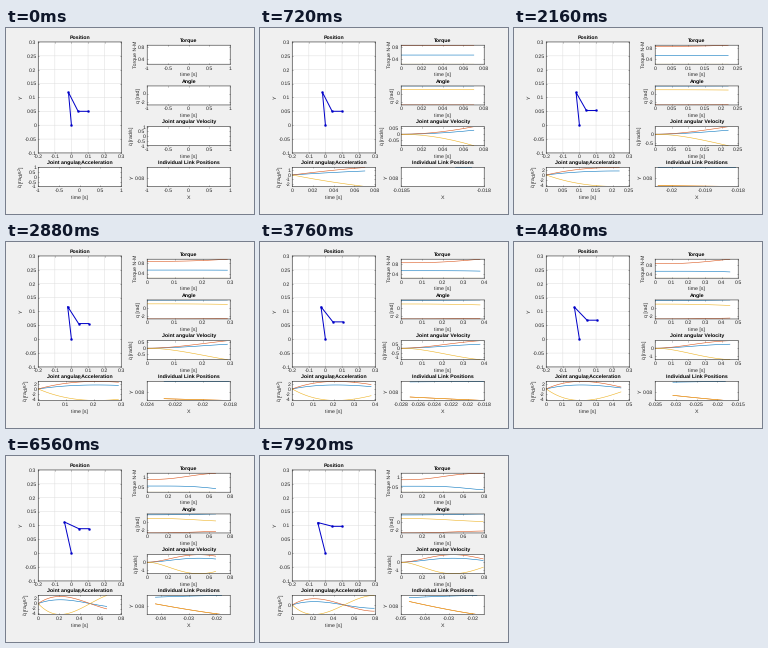
These frames come from a looping animation (248x186 px, 8 s). A matplotlib script:

```python
import math

import matplotlib.pyplot as plt
import numpy as np
from matplotlib.animation import FuncAnimation

W, H, PT = 248, 186, 0.72
BLUE, ORANGE, YELLOW = "#0072bd", "#d95319", "#edb120"
INK = "#262626"

plt.rcParams.update({
    "font.family": "Liberation Sans", "font.size": 5.2 * PT,
    "text.hinting": "none", "path.snap": False,
    "mathtext.default": "regular", "axes.unicode_minus": False,
    "axes.linewidth": 0.55 * PT, "axes.edgecolor": INK,
    "axes.labelcolor": INK, "axes.labelsize": 5.3 * PT,
    "xtick.color": INK, "ytick.color": INK,
})

# ---- three-link arm, quintic joint trajectory lasting one second ----
LINKS = np.array([0.12, 0.09, 0.06])
Q0 = np.array([1.722, -2.589, 0.867])
DQ = np.array([0.265, 0.499, -0.764])
WEIGHT = 7.4

T = np.arange(80) * 0.01
S = 10 * T**3 - 15 * T**4 + 6 * T**5
V = 30 * T**2 * (1 - T)**2
A = 60 * T - 180 * T**2 + 120 * T**3

angle = Q0 + np.outer(S, DQ)
velocity = np.outer(V, DQ)
accel = np.outer(A, DQ)
heading = np.cumsum(angle, axis=1)
jx = np.cumsum(LINKS * np.cos(heading), axis=1)
jy = np.cumsum(LINKS * np.sin(heading), axis=1)


def gravity_torque():
    start = np.column_stack([np.zeros(len(T)), jx[:, :2]])
    centre = (start + jx) / 2
    return np.column_stack([
        WEIGHT * (centre[:, k:] - start[:, k:k + 1]).sum(axis=1)
        for k in range(3)])


torque = gravity_torque()


# ---- axis limits and ticks ----
STEPS = [m * 10.0**e for e in range(-5, 2) for m in (1, 2, 5)]
WIDE, TALL = 83, 19


def pick_step(span, cap, steps=STEPS):
    return next((s for s in steps if span / s <= cap), steps[-1])


def ticks(lo, hi, step):
    first = math.ceil(lo / step - 1e-6)
    last = math.floor(hi / step + 1e-6)
    vals = [round(k * step, 8) + 0.0 for k in range(first, last + 1)]
    return vals, [f"{v:g}" for v in vals]


def scale_x(ax, lo, hi, steps=STEPS):
    """Round the limits outwards and thin labels that would collide."""
    if hi - lo < 1e-9:
        lo, hi, step = -1, 1, 0.5
    else:
        step = pick_step(hi - lo, 6, steps)
        lo = math.floor(lo / step + 1e-6) * step
        hi = math.ceil(hi / step - 1e-6) * step
    ax.set_xlim(lo, hi)
    vals, names = ticks(lo, hi, step)
    gap = max(16, 2.6 * max(map(len, names)))
    while WIDE * step / (hi - lo) < gap:
        step *= 2
    ax.set_xticks(*ticks(lo, hi, step))


def scale_y(ax, data, gap):
    """Fit the limits tightly to the data."""
    lo, hi = data.min(), data.max()
    if hi - lo < 1e-9:
        lo, hi = -1, 1
    step = pick_step(hi - lo, TALL / 4.43)
    while TALL * step / (hi - lo) < gap:
        step *= 2
    ax.set_ylim(lo, hi)
    ax.set_yticks(*ticks(lo, hi, step))


# ---- layout ----
fig = plt.figure(figsize=(W / 100, H / 100), dpi=100, facecolor="#f0f0f0")


def label(x, y, s, **kw):
    fig.text(x / W, 1 - y / H, s, ha="center", va="center", **kw)


def panel(x0, y0, height, title, xlabel, ylabel):
    y1 = y0 + height
    ax = fig.add_axes([x0 / W, 1 - y1 / H, WIDE / W, height / H])
    ax.tick_params(direction="in", length=0.9 * PT, width=0.45 * PT,
                   pad=1.7 * PT, top=True, right=True)
    ax.set_ylabel(ylabel, labelpad=0.3 * PT)
    mid = x0 + WIDE / 2
    label(mid, y0 - 4.6, title, weight="bold", size=5.2 * PT, color="black")
    label(mid, y1 + 10.9, xlabel, size=5.3 * PT, color=INK)
    return ax


def curves(ax):
    return [ax.plot([], [], color=c, lw=0.55 * PT)[0]
            for c in (BLUE, ORANGE, YELLOW)]


LEFT, RIGHT = 32.24, 141.2
ROWS = [17.2 + 40.75 * k for k in range(4)]

pos = panel(LEFT, 13.95, 111, "Position", "X", "Y")
pos.set_xlim(-0.2, 0.3)
pos.set_ylim(-0.1, 0.3)
pos.set_xticks(*ticks(-0.2, 0.3, 0.1))
pos.set_yticks(*ticks(-0.1, 0.3, 0.05))
pos.grid(color="#dfdfdf", lw=0.5 * PT)
pos.set_axisbelow(True)
arm, = pos.plot([], [], "-o", color="#0000c8", lw=1.0 * PT,
                ms=2.1 * PT, mew=0.3 * PT)

tau_ax = panel(RIGHT, ROWS[0], TALL, "Torque", "time [s]", "Torque N-M")
ang_ax = panel(RIGHT, ROWS[1], TALL, "Angle", "time [s]", "q [rad]")
vel_ax = panel(RIGHT, ROWS[2], TALL, "Joint angular Velocity", "time [s]",
               r"$\dot{q}$ [rad/s]")
acc_ax = panel(LEFT, ROWS[3], TALL, "Joint angular Acceleration", "time [s]",
               r"$\ddot{q}$ [rad/s$^2$]")
link_ax = panel(RIGHT, ROWS[3], TALL, "Individual Link Positions", "X", "Y")

# axes, data, lines, smallest distance between tick labels
plots = [
    (tau_ax, torque, curves(tau_ax), 7),
    (ang_ax, angle, curves(ang_ax), 4.4),
    (vel_ax, velocity, curves(vel_ax), 4.4),
    (acc_ax, accel, curves(acc_ax), 4.4),
    (link_ax, jy, curves(link_ax), 7),
]
LINK_STEPS = [0.0005, 0.002, 0.005]


def update(i):
    j = min((80 * i + 50) // 100, len(T) - 1)
    n = j + 1
    arm.set_data(np.r_[0, jx[j]], np.r_[0, jy[j]])
    for ax, data, lines, gap in plots:
        x = jx[:n, 0] if ax is link_ax else T[:n]
        for line, y in zip(lines, data[:n].T):
            line.set_data(x, y)
        scale_x(ax, x.min(), x.max(),
                LINK_STEPS if ax is link_ax else STEPS)
        scale_y(ax, data[:n], gap)
    return []


anim = FuncAnimation(fig, update, frames=100, interval=80, repeat=True,
                     repeat_delay=0, init_func=lambda: update(0), blit=False)
plt.show()
```
